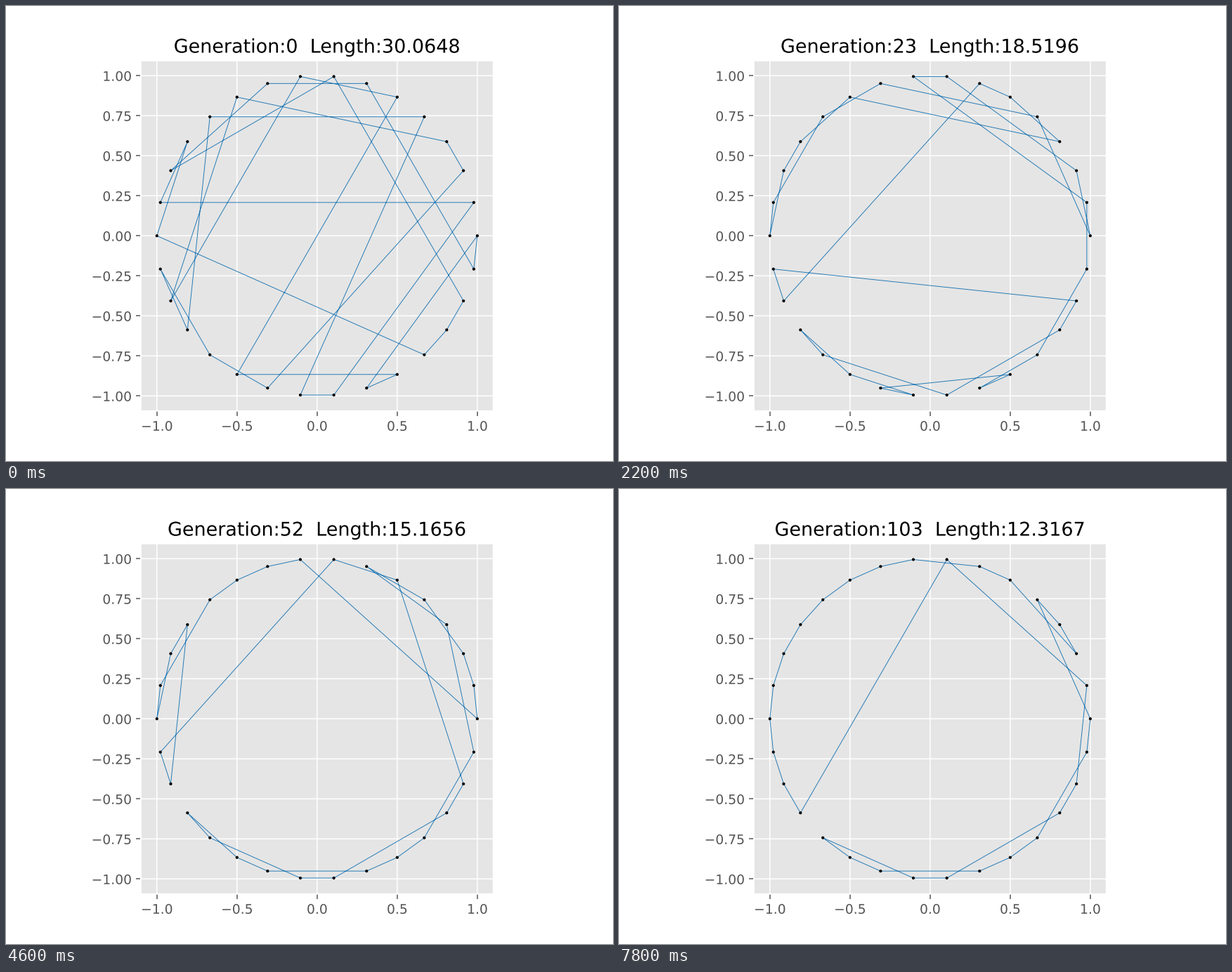
These frames come from a looping animation (864 px wide and 648 px high, 8 s). A matplotlib script:

```python
import numpy as np
import matplotlib.pyplot as plt
from matplotlib.animation import FuncAnimation
from matplotlib.patheffects import Normal
from matplotlib.text import Text

plt.style.use("ggplot")

N = 30
angle = 2 * np.pi * np.arange(N) / N
cities = np.column_stack([np.cos(angle), np.sin(angle)])

# Milestones: frame, generation, visiting order
MILESTONES = [
    (0, 0, [10, 3, 2, 21, 19, 16, 18, 11, 4, 22, 23, 1, 14, 12, 15,
            26, 27, 28, 7, 13, 9, 6, 29, 0, 24, 25, 20, 5, 8, 17]),
    (11, 23, [8, 7, 2, 0, 4, 9, 11, 14, 15, 13, 12, 10, 3, 5, 6, 17,
              16, 28, 27, 23, 19, 18, 20, 22, 21, 25, 24, 26, 29, 1]),
    (23, 52, [*range(8, 12), 14, 15, 13, 12, 17, 16, 7, 5, 28, 27, 23, 22,
              19, 18, 20, 21, *range(24, 27), 29, 3, 6, 4, 2, 1, 0]),
    (39, 103, [*range(8, 19), 7, 1, 28, 27, 23, 22, *range(19, 22),
               *range(24, 27), 29, 0, 4, 3, 2, 5, 6]),
]


def closed_path(tour):
    return cities[tour + tour[:1]]


def length(tour):
    return np.hypot(*np.diff(closed_path(tour), axis=0).T).sum()


def relocate(tour, city, after):
    rest = [c for c in tour if c != city]
    at = rest.index(after) + 1
    return rest[:at] + [city] + rest[at:]


def line_up(tour, goal):
    """States passed while each city moves behind its predecessor in goal."""
    states = [tour]
    for before, city in zip(goal, goal[1:]):
        states.append(relocate(states[-1], city, before))
    return states


def morph(start, end, steps):
    """Tours from start to end whose lengths best follow an ease-out."""
    progress = (np.arange(1, steps + 1) / steps) ** 0.8
    wanted = length(start) + (length(end) - length(start)) * progress
    best_cost = np.inf
    for goal in (end, end[::-1]):
        for r in range(N):
            states = line_up(start, goal[r:] + goal[:r])
            gaps = np.abs(np.subtract.outer(wanted, [length(s) for s in states]))
            cost = gaps.min(axis=1).sum()
            if cost < best_cost:
                best_cost = cost
                best = [states[k] for k in gaps.argmin(axis=1)]
    return best[:-1] + [end]


frames, gens, orders = zip(*MILESTONES)
tours = [orders[0]]
for k in range(1, len(orders)):
    tours += morph(orders[k - 1], orders[k], frames[k] - frames[k - 1])
generations = np.interp(np.arange(len(tours)), frames, gens).astype(int)

fig, ax = plt.subplots(figsize=(6.4, 4.8), dpi=135)
ax.set_aspect("equal")
route, = ax.plot(*closed_path(tours[0]).T, color="#1f77b4", lw=0.5)
for city in cities:
    ax.add_artist(plt.Circle(city, 0.0092, fc="black", lw=0, zorder=3))
ax.set_xticks(np.arange(-1, 1.1, 0.5))
ax.set_yticks(np.arange(-1, 1.1, 0.25))
title = ax.set_title("")

# Smooth sub-pixel drawing: no snapping, text as unhinted outlines
fig.canvas.draw()
for artist in fig.findobj():
    artist.set_snap(False)
for text in fig.findobj(Text):
    text.set_path_effects([Normal()])


def draw(i):
    route.set_data(*closed_path(tours[i]).T)
    title.set_text(f"Generation:{generations[i]}  Length:{length(tours[i]):.4f}")
    return route, title


anim = FuncAnimation(fig, draw, frames=len(tours), interval=200,
                     repeat=True, repeat_delay=0, blit=False)
plt.show()
```
